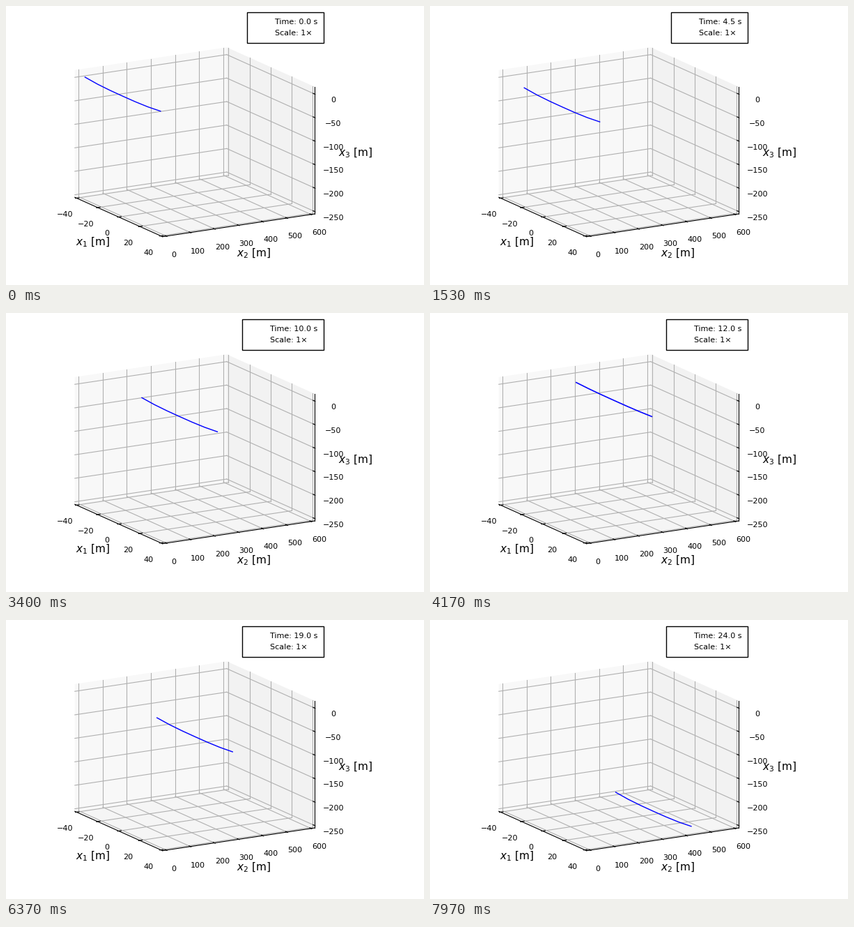
A matplotlib script that plays this animation: 600x400 px, repeating every 8 s.

```python
import numpy as np
import matplotlib.pyplot as plt
from matplotlib.animation import FuncAnimation
from matplotlib.patches import Polygon, Rectangle

plt.rcParams["font.family"] = "DejaVu Sans"
plt.rcParams["mathtext.fontset"] = "dejavusans"

FRAMES = 240
LOOP_MS = 8000
GRID = "#b0b0b0"

fig = plt.figure(figsize=(6, 4), dpi=100, facecolor="white")
ax = fig.add_axes([0, 0, 1, 1])
ax.set_xlim(0, 600)
ax.set_ylim(400, 0)
ax.axis("off")

# Orthographic view of a 4:4:3 box: 15 degrees up, turned by 30 degrees
SIDE = 251.8
up, turn = np.radians([15, 30])
E1 = SIDE * np.array([np.sin(turn), np.cos(turn) * np.sin(up)])
E2 = SIDE * np.array([np.cos(turn), -np.sin(turn) * np.sin(up)])
E3 = SIDE * np.array([0, -0.75 * np.cos(up)])
CORNER = np.array([98.8, 274.3])


def at(a, b, c):
    return CORNER + a * E1 + b * E2 + c * E3


def segment(p, q, color, z):
    ax.plot([p[0], q[0]], [p[1], q[1]], color=color, lw=0.8, zorder=z)


def path(color, z, *corners):
    points = [at(*c) for c in corners]
    for p, q in zip(points, points[1:]):
        segment(p, q, color, z)


def pane(shade, *corners):
    ax.add_patch(Polygon([at(*c) for c in corners], facecolor=shade,
                         edgecolor="none", zorder=1))


def label(x, y, s, size=8, ha="center"):
    return ax.text(x, y, s, fontsize=size, ha=ha, va="baseline", zorder=6)


def tick(p, direction, x, y, value):
    step = direction / 12
    segment(p + 0.1 * step, p - 0.2 * step, "black", 4)
    label(x, y, str(value).replace("-", "\u2212"))


pane("#f8f8f8", (0, 0, 0), (0, 1, 0), (0, 1, 1), (0, 0, 1))
pane("#f2f2f2", (0, 1, 0), (1, 1, 0), (1, 1, 1), (0, 1, 1))
pane("#f5f5f5", (0, 0, 0), (1, 0, 0), (1, 1, 0), (0, 1, 0))

for i, v in enumerate(range(-40, 41, 20)):
    a = 0.02 + 0.96 * i / 4
    path(GRID, 2, (a, 0, 0), (a, 1, 0), (a, 1, 1))
    tick(at(a, 0, 0), -E2, 84.9 + 30 * i, 302.4 + 13.54 * i, v)

for i, v in enumerate(range(0, 601, 100)):
    b = (v + 15.5) / 629.5
    path(GRID, 2, (1, b, 0), (0, b, 0), (0, b, 1))
    tick(at(1, b, 0), E1, 240.8 + 34.75 * i, 359.9 - 5.35 * i, v)

for i, v in enumerate(range(0, -251, -50)):
    c = 0.02 + 0.96 * (v + 250) / 260
    path(GRID, 2, (0, 0, c), (0, 1, c), (1, 1, c))
    tick(at(1, 1, c), E1, 469.6, 138.2 + 33.7 * i, v)

path("black", 4, (0, 0, 0), (1, 0, 0), (1, 1, 0), (1, 1, 1))

label(125, 343.5, "$x_1$ [m]", 11)
label(355.6, 359.5, "$x_2$ [m]", 11)
label(502, 215.5, "$x_3$ [m]", 11)

# Key positions of the left wing tip, evenly spaced in time
STEP = 2.4
KEYS = np.array([
    (113.4, 102), (123.8, 101.2), (137.5, 120.2), (161.8, 136.5),
    (189.2, 126.8), (207.8, 104), (215.2, 89.8), (220.4, 100.7),
    (216.6, 142.8), (225.2, 213), (268.7, 248),
])


def spline_slopes(keys):
    """Slopes of the natural cubic spline through evenly spaced keys."""
    n = len(keys)
    m = 4 * np.eye(n) + np.eye(n, k=1) + np.eye(n, k=-1)
    m[0, 0] = m[-1, -1] = 2
    padded = np.pad(keys, ((1, 1), (0, 0)), mode="edge")
    return np.linalg.solve(m, 3 * (padded[2:] - padded[:-2]))


SLOPES = spline_slopes(KEYS)


def tip(t):
    k = min(int(t / STEP), len(KEYS) - 2)
    u = t / STEP - k
    w = 1 - u
    return ((1 + 2 * u) * w * w * KEYS[k] + u * w * w * SLOPES[k]
            + u * u * (1 + 2 * w) * KEYS[k + 1] - u * u * w * SLOPES[k + 1])


span = np.linspace(-1, 1, 7)
sag = 1 - np.abs(span) ** 2.8
wing, = ax.plot([], [], color="blue", lw=1, zorder=5)

box = Rectangle((346, 9), 110, 43.7, facecolor="white", edgecolor="black",
                lw=1, zorder=5)
ax.add_patch(box)
clock = label(386, 26, "", ha="left")
scale = label(386, 42, "Scale: 1\u00d7", ha="left")


def update(i):
    t = i / 10
    x, y = tip(t)
    # the wing flattens around the top of the climb
    flat = np.exp(-((t - 14.7) / 3.8) ** 4)
    wing.set_data(x + 54.2 * (span + 1),
                  y + 24.4 * (span + 1) + (2.9 - 1.8 * flat) * sag)
    wing.set_linewidth(1 + 0.2 * flat)

    # two significant digits
    shown = t if t < 10 else float(round(t))
    clock.set_text(f"Time: {shown:.1f} s")
    shift = 7 if t >= 10 else 0
    box.set_x(346 - shift)
    box.set_width(110 + shift)
    clock.set_x(386 - shift)
    scale.set_x(386 - shift)
    return wing, box, clock, scale


anim = FuncAnimation(fig, update, frames=FRAMES, interval=LOOP_MS / FRAMES,
                     repeat=True, repeat_delay=0, blit=False)
plt.show()
```
